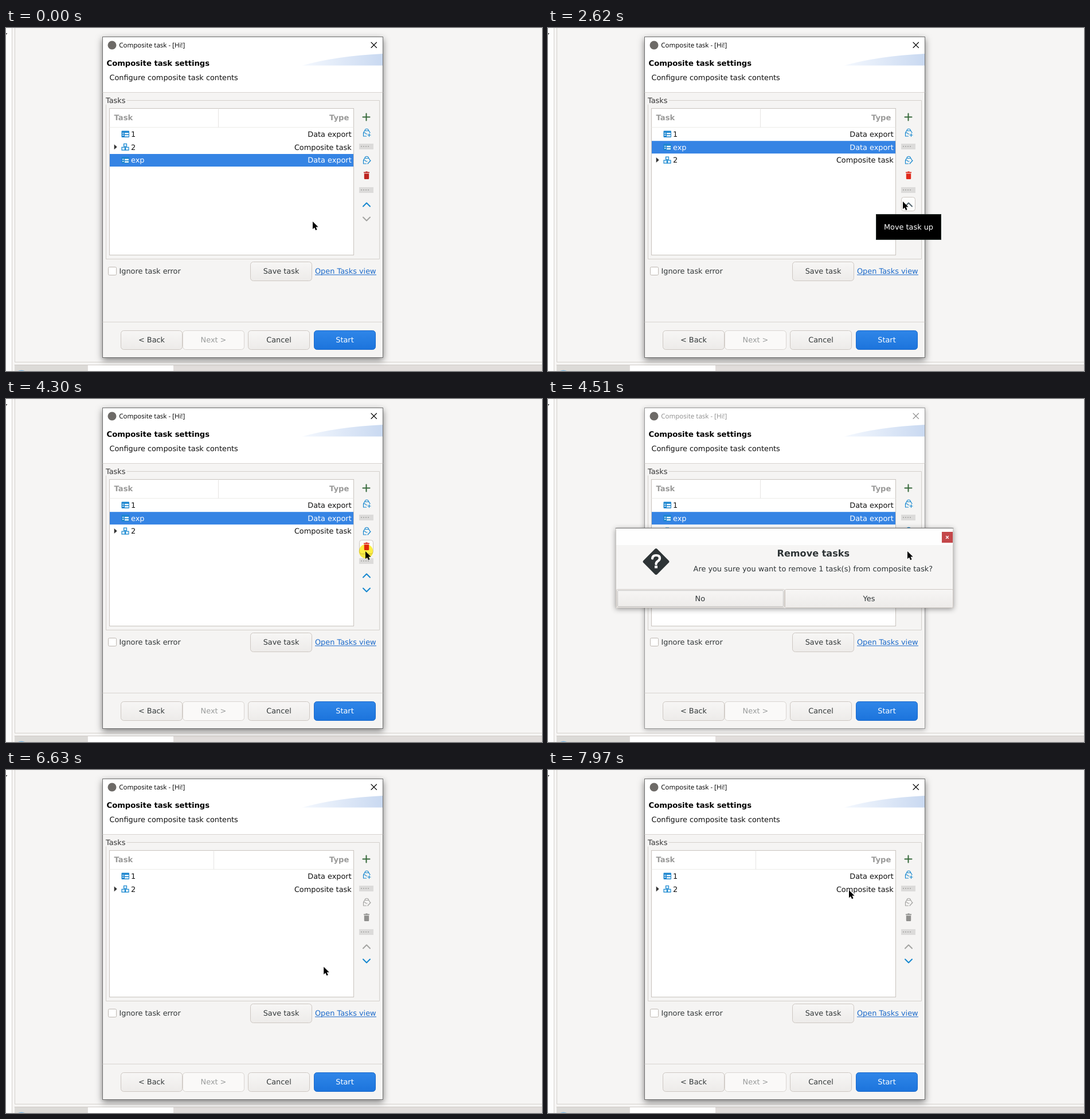
Animation, 935 px wide and 599 px high, one loop 8000 ms. Source, as an HTML page:

```html
<!DOCTYPE html>
<html lang="en">
<head>
<meta charset="utf-8">
<title>Composite task</title>
<style>
html, body { margin: 0; width: 100%; height: 100%; overflow: hidden; background: #f6f5f4; }
svg { display: block; width: 935px; height: 599px; }
text { font: 12.87px "DejaVu Sans", sans-serif; text-rendering: geometricPrecision; white-space: pre; }
.bold { font-weight: bold; font-size: 13.15px; }
.big { font-weight: bold; font-size: 16.1px; }
.caption { font: 11.55px "Open Sans", sans-serif; }
.line { fill: none; stroke-linecap: round; stroke-linejoin: round; }
#glow { mix-blend-mode: multiply; }
</style>
</head>
<body>
<svg id="stage" viewBox="0 0 935 599" xmlns="http://www.w3.org/2000/svg"></svg>
<script>
const BLUE = '#1486cf', GREY = '#a3a3a1', EDGE = '#cdc7c2';
const LOOP = 8000, PITCH = 22.8;

const rect = (x, y, w, h, fill, extra = '') =>
  `<rect x="${x}" y="${y}" width="${w}" height="${h}" fill="${fill}" ${extra}/>`;
const box = (x, y, w, h, fill, stroke = EDGE, r = 0, extra = '') =>
  rect(x + .5, y + .5, w - 1, h - 1, fill, `stroke="${stroke}" rx="${r}" ${extra}`);
const text = (s, x, y, fill = '#111', anchor = 'start', cls = '') =>
  `<text x="${x}" y="${y}" fill="${fill}" text-anchor="${anchor}" class="${cls}">${s}</text>`;
const line = (d, stroke, w = 1, extra = '') =>
  `<path d="${d}" stroke="${stroke}" stroke-width="${w}" class="line" ${extra}/>`;
const shape = (d, fill, extra = '') => `<path d="${d}" fill="${fill}" ${extra}/>`;
const group = (id, body, extra = '') => `<g id="${id}" ${extra}>${body}</g>`;
const fade = (id, a, b, dir = 'x2="0" y2="1"') =>
  `<linearGradient id="${id}" ${dir}><stop stop-color="${a}"/><stop offset="1" stop-color="${b}"/></linearGradient>`;
const shadow = (id, dy, blur, alpha) =>
  `<filter id="${id}" x="-10%" y="-15%" width="120%" height="130%">
   <feDropShadow dx="0" dy="${dy}" stdDeviation="${blur}" flood-opacity="${alpha}"/></filter>`;

const button = (label, x, y, fill = 'url(#face)', stroke = EDGE, ink = '#333839') =>
  box(x, y, 108, 34, fill, stroke, 5) + text(label, x + 54, y + 20.7, ink, 'middle');

const grip = y => rect(616, y, 25, 10, '#dcdbda') +
  [619, 623, 627, 631].map(x => rect(x, y + 4, 2, 1.5, '#a5a5a3')).join('');

const tray = y => `M626 ${y - 4}a3.3 3.3 0 0 1 6.5 0M623.5 ${y + 6}v-6l2-3.5h7.5l2 3.5
  M623.5 ${y}h3l1.5 2h2M623.5 ${y + 6}h5`;

const tableIcon = rect(201.5, 179.5, 13.5, 11.5, '#1d86cf', 'rx="1"') +
  [[203, 183, 2.5, 1.5], [203, 186.5, 2.5, 1.5], [207, 183, 7, 2.5], [207, 187, 7, 2.5]]
    .map(r => rect(...r, '#f4fbff')).join('');
const stackIcon = [[205.5, 179.5, 5, 4.5], [202, 185.5, 5.5, 5], [208.5, 185.5, 5.5, 5]]
  .map(r => rect(...r, '#e6f3fc', `stroke="${BLUE}" stroke-width="1.2"`)).join('');

const row = (id, icon, name, type, ink, back = '') => group(id,
  back + icon + text(name, 218, 189.8, ink) + text(type, 602.7, 189.8, ink, 'end'));

const backdrop =
  rect(0, 0, 935, 599, '#f6f5f4') + rect(0, 0, 10, 599, '#fdfdfd') +
  line('M10.5 0V599M15.5 0V583.5H935', '#d5d1cd') +
  shape('M0 9h2.5L0 12z', '#444') +
  rect(15, 589, 920, 10, '#e1dddb') + rect(15, 589, 127, 10, '#dcdad7') +
  line('M15 588.5H935', '#d0ccc8') + rect(143, 589, 149, 10, '#fff') +
  shape('M21 599q6-3 12 0z', '#7fb9e2');

const main =
  box(168, 15, 490, 561, '#f5f4f3', '#6e6e6e', 0, 'id="frame"') +
  rect(169, 16, 488, 96, '#fff') +
  shape('M517 65.5Q575 49 657 45V65.5z', 'url(#swoosh)') +
  line('M169 112.5H657M169 513.5H657', '#d8d4d0') +
  '<circle cx="185" cy="30" r="7.5" fill="#6d6a67"/>' +
  group('caption', text('Composite task - [Hi!]', 197.3, 34.2, 'currentColor', 'start', 'caption') +
    line('M637 25l9.5 9.5M646.5 25l-9.5 9.5', 'currentColor', 1.1)) +
  text('Composite task settings', 175.5, 66, '#000', 'start', 'bold') +
  text('Configure composite task contents', 180.5, 91) +
  text('Tasks', 174, 130.6, '#333') +
  line('M211 126.5H651.5V403.5H174.5V134', '#d3cfcb') +
  box(180, 140, 427, 257, '#fff', '#c8c3be') +
  line('M181 173.5H606', '#ececea') +
  line('M370.5 141V173', '#e6e5e3', 1, 'id="column"') +
  text('Task', 188.5, 161, '#9a9a99', 'start', 'bold') +
  text('Type', 598.3, 161, '#9a9a99', 'end', 'bold') +
  row('first', tableIcon, '1', 'Data export', '#111') +
  row('pair', stackIcon + shape('M188.7 180.5v9l5-4.5z', '#333'), '2', 'Composite task', '#111') +
  row('exp', tableIcon, 'exp', 'Data export', '#fff', rect(181, 174.4, 425, 22, '#3584e4')) +
  box(178, 417, 15, 15, '#fff', '#bdb7b1', 2) +
  text('Ignore task error', 197.5, 429, '#333839') +
  button('Save task', 426, 408) +
  text('Open Tasks view', 539, 429, '#1b6acb') + rect(539, 430.5, 107, 1, '#1b6acb') +
  button('&lt; Back', 200, 528) +
  button('Next &gt;', 308, 528, '#faf9f8', '#d9d5d1', '#9a9c9c') +
  button('Cancel', 422, 528) +
  button('Start', 537, 528, 'url(#accent)', '#1b6acb', '#fff');

const tools =
  line('M628.5 149.5V161.5M622.5 155.5H634.5', '#36693b', 2, 'stroke-linecap="butt"') +
  line(tray(183) + 'M633.5 184.5v5M631 187h5', BLUE, 1.2) + grip(202) +
  line(tray(231) + 'M631 237l5-5.5', BLUE, 1.2, 'id="edit"') + grip(278) +
  box(616, 246, 25, 25, '#fcfcfb', EDGE, 4, 'id="trashHover"') +
  box(616, 295, 25, 25, '#fcfcfb', EDGE, 4, 'id="upHover"') +
  shape('M624 251.5h3l.7-1h2.6l.7 1h3v1.7h-10zM624.8 254.2h8.4v8.6q0 1.2-1.2 1.2h-6q-1.2 0-1.2-1.2z',
    'currentColor', 'id="trash"') +
  line('M623 311.5l6-6 6 6', 'currentColor', 2, 'id="up"') +
  line('M623 330.5l6 6 6-6', 'currentColor', 2, 'id="down"');

const tip = group('tip', box(572, 325, 114, 45, '#000', '#26302c') +
  text('Move task up', 629, 352.3, '#fff', 'middle'));

const dialog = group('dialog',
  rect(118, 225, 589, 140, '#f6f5f4', 'filter="url(#soft)"') +
  rect(119, 226, 587, 29, '#fefefe') + line('M118 225.5H707', '#6b6b6b') +
  line('M118.5 226V365M706.5 226V365', '#c9c6c3') +
  rect(687, 232, 19, 19, '#c4474a') + line('M694.5 239.5l4 4M698.5 239.5l-4 4', '#fff', 1.3) +
  rect(171.5, 267, 34, 34, '#2e3436', 'rx="3" transform="rotate(45 188.5 284)"') +
  line('M182 278.5q.5-5.5 6.5-5.5 6.5 0 6.5 5 0 3-3.5 5.2-3 1.9-3 5', '#fff', 4.2, 'stroke-linecap="butt"') +
  rect(186, 291, 5, 4.5, '#fff') +
  text('Remove tasks', 462.8, 274.8, '#2e3436', 'middle', 'big') +
  text('Are you sure you want to remove 1 task(s) from composite task?', 253.6, 301.3, '#2e3436') +
  box(119, 332, 294, 33, 'url(#face)', EDGE, 2) +
  box(413, 332, 294, 33, 'url(#face)', EDGE, 2, 'id="yes"') +
  box(121, 334, 290, 29, 'none', '#8f8d8b', 1, 'stroke-dasharray="1 1"') +
  text('No', 265.3, 353.2, '#2e3436', 'middle') + text('Yes', 560, 353.2, '#2e3436', 'middle'));

const pointer = group('pointer',
  shape('M0 0V13.2L3 10.4 5.2 15.2 7.6 14.1 5.4 9.4H9.6z', '#000',
    'stroke="#fff" stroke-width=".8" stroke-opacity=".7" paint-order="stroke"')) +
  '<circle id="glow" r="12.3" fill="#fff030" opacity=".9"/>';

const stage = document.getElementById('stage');
stage.innerHTML = '<defs>' + fade('face', '#f7f6f5', '#edebe9') + fade('accent', '#2f86e8', '#1c74dc') +
  fade('swoosh', '#f4f8fe', '#c9d9f1', 'x2="1" y2="0"') +
  shadow('deep', 4, 6, .5) + shadow('soft', 2, 5, .4) + shadow('faint', 2, 4, .3) + '</defs>' +
  backdrop + main + tools + tip + dialog + pointer;

const ui = {};
stage.querySelectorAll('[id]').forEach(el => ui[el.id] = el);

// time, x, y
const path = [
  [0, 535, 338], [430, 535, 338], [560, 580, 303], [690, 628, 264], [820, 659, 272],
  [940, 660, 292], [1080, 634, 306], [1190, 626, 307], [1260, 626, 307], [1340, 622, 305],
  [1590, 622, 305], [1690, 619, 303], [2640, 619, 303], [2800, 662, 284], [3000, 745, 260],
  [3150, 779, 253], [4300, 779, 253], [4300, 627, 266], [5090, 627, 266], [5220, 614, 293],
  [5400, 577, 331], [5590, 561, 339], [6560, 561, 339], [6780, 540, 354], [7070, 540, 354],
  [7200, 512, 313], [7340, 474, 245], [7450, 463, 211], [7560, 478, 204], [7690, 515, 212],
  [7770, 524, 217], [7880, 524, 217], [7970, 525, 210], [LOOP, 525, 210]
];

const within = (t, a, b) => t >= a && t < b;
const show = (el, on) => el.setAttribute('visibility', on ? 'visible' : 'hidden');
const place = (el, x, y) => el.setAttribute('transform', `translate(${x} ${y})`);
const ramp = (t, a, b) => Math.min(1, Math.max(0, (t - a) / (b - a)));

function spot(t) {
  const i = path.findIndex(p => p[0] > t);
  const [a, b] = [path[i - 1], path[i]];
  const k = ramp(t, a[0], b[0]);
  return [1, 2].map(n => a[n] + (b[n] - a[n]) * k);
}

function draw(t) {
  const moved = t >= 1590, removed = t >= 6460;
  const modal = within(t, 4400, 6460);
  const onUp = within(t, 1050, 2700), pressed = within(t, 1400, 1590);
  const onTrash = within(t, 650, 780) || within(t, 4300, 4450);

  place(ui.pair, 0, PITCH * (moved && !removed ? 2 : 1));
  place(ui.exp, 0, PITCH * (moved ? 1 : 2));
  show(ui.exp, !removed);
  place(ui.column, removed ? -8 : 0, 0);

  show(ui.trashHover, onTrash);
  show(ui.upHover, onUp);
  ui.upHover.setAttribute('fill', pressed ? '#d8d5d1' : '#fcfcfb');
  ui.edit.setAttribute('stroke', removed ? GREY : BLUE);
  ui.trash.style.color = removed ? '#8f8f8d' : t < 650 ? '#bd2420' : '#e02a1c';
  ui.up.style.color = removed ? GREY : pressed ? '#8b8b87' : onUp ? '#53646e' : BLUE;
  ui.down.style.color = moved ? BLUE : GREY;
  show(ui.tip, within(t, 2090, 2700));

  ui.caption.style.color = modal ? '#8e8e8e' : '#000';
  ui.frame.setAttribute('filter', modal ? 'url(#faint)' : 'url(#deep)');
  ui.frame.setAttribute('stroke', modal ? '#989898' : '#6e6e6e');
  const alpha = ramp(t, 4390, 4500) * (1 - ramp(t, 6450, 6560));
  show(ui.dialog, alpha > 0);
  ui.dialog.setAttribute('opacity', alpha);
  ui.yes.setAttribute('fill', t >= 5410 ? '#f9f8f7' : 'url(#face)');

  const [x, y] = spot(t);
  place(ui.pointer, x, y);
  place(ui.glow, x + 1, y);
  show(ui.glow, within(t, 1390, 1530) || within(t, 4300, 4390) || within(t, 6300, 6430));
}

const start = performance.now();
function tick() {
  draw((performance.now() - start) % LOOP);
  requestAnimationFrame(tick);
}
tick();
</script>
</body>
</html>
```
